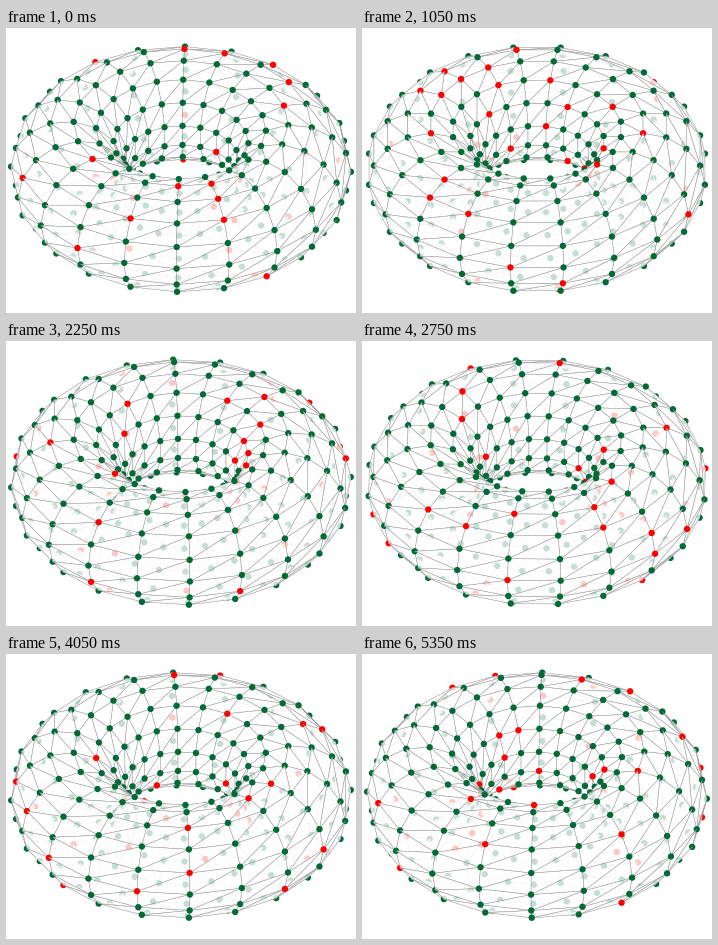
Recreate the animation shown at these times as a matplotlib script. Size 350 by 285 pixels, loop 5400 ms.

```python
import numpy as np
import matplotlib.pyplot as plt
from matplotlib.animation import FuncAnimation
from matplotlib.collections import PolyCollection

W, H, DPI = 350, 285, 100
FRAMES, INTERVAL = 108, 50
COLS, ROWS = 20, 15
BIG, SMALL = 113.3, 56.7
TILT = np.radians(35.8)
DOT = 3.2
FIRE_RATE = 0.13
GREEN, RED = (0, 0.41, 0.216, 1), (1, 0, 0, 1)
FACE = (1, 1, 1, 0.78)

row, col = np.divmod(np.arange(ROWS * COLS), COLS)
v = 2 * np.pi * row / ROWS
rho, height = BIG + SMALL * np.cos(v), SMALL * np.sin(v)


def cell(r, c):
    return r % ROWS * COLS + c % COLS


a, b = cell(row, col), cell(row, col + 1)
c, d = cell(row + 1, col + 1), cell(row + 1, col)
TRIS = np.vstack([np.column_stack([a, b, c]), np.column_stack([a, c, d])])

ring = np.linspace(0, 2 * np.pi, 18, endpoint=False)
DISC = DOT * np.column_stack([np.cos(ring), np.sin(ring)])


def project(turn):
    """Screen points, depth towards the viewer, and how far nodes face it."""
    u = np.radians(turn + 360 / COLS * col)
    out = rho * np.cos(u)
    x = W / 2 + rho * np.sin(u)
    y = 141.2 + out * np.sin(TILT) - height * np.cos(TILT)
    depth = out * np.cos(TILT) + height * np.sin(TILT)
    facing = np.cos(v) * np.cos(u) * np.cos(TILT) + np.sin(v) * np.sin(TILT)
    return np.column_stack([x, y]), depth, facing


fig = plt.figure(figsize=(W / DPI, H / DPI), dpi=DPI, facecolor="white")
ax = fig.add_axes([0, 0, 1, 1])
ax.set_xlim(0, W)
ax.set_ylim(H, 0)
ax.axis("off")
mesh = PolyCollection([], closed=True)
ax.add_collection(mesh, autolim=False)


def draw(n):
    pts, depth, facing = project(0.5 * n - 1.5)
    tri = pts[TRIS]
    e1, e2 = tri[:, 1] - tri[:, 0], tri[:, 2] - tri[:, 0]
    front = e1[:, 0] * e2[:, 1] - e1[:, 1] * e2[:, 0] < 0
    grey = np.where(front, 0.58, 0.76)
    edges = np.column_stack([grey, grey, grey, np.ones(len(grey))])

    fired = np.random.default_rng(500 + n).random(len(pts)) < FIRE_RATE
    dots = np.where(fired[:, None], RED, GREEN)

    verts = list(tri) + list(pts[:, None] + DISC)
    faces = np.vstack([np.tile(FACE, (len(tri), 1)), dots])
    edges = np.vstack([edges, dots])
    widths = np.r_[np.full(len(tri), 0.32), np.zeros(len(pts))]
    # Lift dots off the triangles that meet there
    lift = np.where(facing > 0, 18, -22 * facing)
    order = np.argsort(np.r_[depth[TRIS].mean(axis=1), depth + lift])

    mesh.set_verts([verts[i] for i in order])
    mesh.set_facecolor(faces[order])
    mesh.set_edgecolor(edges[order])
    mesh.set_linewidth(widths[order])
    return [mesh]


anim = FuncAnimation(fig, draw, frames=FRAMES, interval=INTERVAL,
                     init_func=lambda: draw(0), repeat=True, repeat_delay=0)
plt.show()
```
